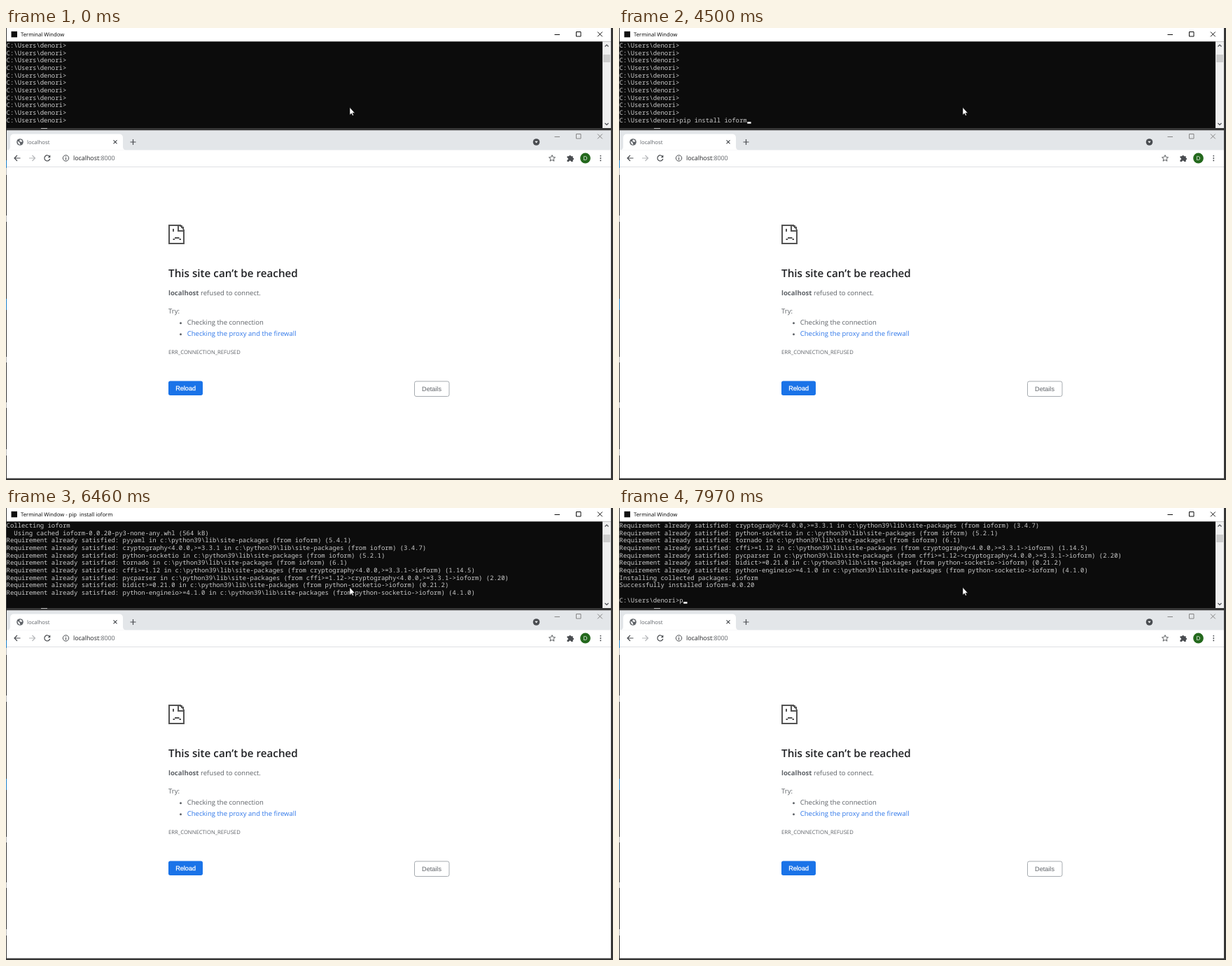
These frames come from a looping animation (867 px wide and 646 px high, 8000 ms). An HTML page:

```html
<!DOCTYPE html>
<html lang="en">
<head>
<meta charset="utf-8">
<title>Install in a terminal</title>
<style>
  html, body { margin: 0; width: 867px; height: 646px; overflow: hidden; background: #363636; }
  svg { display: block; }
  text { font-family: "Open Sans", sans-serif; font-size: 9.55px; fill: #5f6368;
         white-space: pre; text-rendering: geometricPrecision; }
  #title { font-size: 7.7px; fill: #000; }
  #console text { font-family: "Noto Sans Mono", monospace; font-size: 8.93px; fill: #ccc; }
  .button { font-family: "Liberation Sans", sans-serif; font-size: 9.15px; text-anchor: middle; }
  .line { fill: none; stroke: #4a4d51; stroke-width: 1.2; }
</style>
</head>
<body>
<svg width="867" height="646" viewBox="0 0 867 646">
  <defs>
    <path id="controls" d="M783.5 9.5h7.5M814.5 5.5h6.5v6.5h-6.5zM845 5.5l6.8 6.8M851.8 5.5l-6.8 6.8" fill="none"/>
  </defs>

  <!-- Desktop showing past the window edges -->
  <rect width="867" height="646" fill="#363636"/>
  <path d="M0 200h1v10h-1zM0 268h1v9h-1zM0 470h1v8h-1zM0 535h1v8h-1zM0 602h1v9h-1zM50 143h9v1h-9z" fill="#bbb"/>
  <path d="M0 189h1v11h-1zM0 387h1v16h-1z" fill="#1a7fc8"/>

  <!-- Terminal window -->
  <rect x="1" width="863" height="19.5" fill="#fff"/>
  <rect x="7.5" y="4.8" width="8.5" height="8.5" fill="#111"/>
  <text id="title" x="21" y="12"></text>
  <use href="#controls" stroke="#111"/>
  <rect x="1" y="19.5" width="851" height="123.5" fill="#0c0c0c"/>
  <rect x="852" y="19.5" width="12" height="123.5" fill="#f0f0f0"/>
  <rect x="853" y="38" width="10" height="11" fill="#cdcdcd"/>
  <path d="M855.5 26.5l2.5-2.5 2.5 2.5M855.5 136l2.5 2.5 2.5-2.5" class="line"/>
  <g id="console"></g>
  <rect id="caret" y="134.1" width="5.36" height="2.6" fill="#f2f2f2"/>
  <path d="M491 113.6v10.6l2.4-2.2 1.5 3.3 1.6-.7-1.5-3.2h3.2z" fill="#fff" stroke="#111" stroke-width=".5"/>

  <!-- Browser frame -->
  <rect x="1" y="146.5" width="863" height="497" fill="#fff"/>
  <rect x="1" y="146.5" width="863" height="28" fill="#e3e6e9"/>
  <path d="M1 174.5q5 0 5-5v-12.5q0-5.5 5.5-5.5h150q5.5 0 5.5 5.5v12.5q0 5 5 5z" fill="#fff"/>
  <circle cx="20" cy="163" r="4.8" fill="#5f6368"/>
  <path d="M16.5 162q2.5 0 3 1.8t1 3q-3.5-.3-4-4.8M20 159.3q2 .2 3.5 2.7l-2 1-2.3-1.4z" fill="#fff"/>
  <text x="30" y="165.6" style="font-size:7.75px">localhost</text>
  <path d="M153.5 160.4l5 5M158.5 160.4l-5 5M177.5 163h8M181.5 159v8" class="line"/>
  <circle cx="757.5" cy="163" r="4.8" fill="#4a4d51"/>
  <path d="M755.3 161.8h4.4l-2.2 2.6z" fill="#fff"/>
  <use href="#controls" y="146" stroke="#858585"/>
  <rect x="1" y="198" width="863" height="1" fill="#dfe1e4"/>
  <path d="M20.5 186h-8.5M16 182l-4 4 4 4" class="line"/>
  <path d="M33 186h8.5M37.5 182l4 4-4 4" class="line" style="stroke:#b5b7ba"/>
  <path d="M62.3 183.8a4 4 0 1 0 .5 3.2" class="line"/>
  <path d="M63.3 181.6v3.6h-3.6z" fill="#4a4d51"/>
  <circle cx="85.5" cy="186" r="4.2" class="line" style="stroke-width:1"/>
  <path d="M85.5 185.4v3M85.5 183.4v1" class="line"/>
  <text x="96" y="189.4" style="font-size:8.85px"><tspan fill="#202124">localhost</tspan>:8000</text>
  <path d="M780 181.6l1.3 3 3.2.3-2.4 2.1.8 3.2-2.9-1.7-2.9 1.7.8-3.2-2.4-2.1 3.2-.3z" class="line" style="stroke-width:.9"/>
  <path d="M801.5 183.3h2.7a1.4 1.4 0 0 1 2.8 0h2.7v2.4a1.4 1.4 0 0 1 0 2.8v2.5h-2.6a1.5 1.5 0 0 0-3 0h-2.6v-2.6a1.5 1.5 0 0 0 0-3z" fill="#4a4d51"/>
  <circle cx="827.5" cy="186" r="7.4" fill="#24691d"/>
  <text x="827.5" y="189" text-anchor="middle" style="font-size:8px;fill:#fff">D</text>
  <path d="M848.5 182h1.6v1.6h-1.6zM848.5 185.3h1.6v1.6h-1.6zM848.5 188.6h1.6v1.6h-1.6z" fill="#4a4d51"/>

  <!-- Error page -->
  <path d="M249 282h-16v26h21v-20M246 281v9h9M249 281v2h2v2h2v3" class="line" style="stroke:#535353;stroke-width:2"/>
  <path d="M238 287h2v4h-2zM241 299h6.5v2h-6.5zM238.5 301h2.5v2h-2.5zM247.5 301h2.5v2h-2.5z" fill="#535353"/>
  <text x="232" y="356.3" style="font-size:15.25px;font-weight:600;fill:#202124">This site can’t be reached</text>
  <text x="232" y="382.4"><tspan font-weight="700">localhost</tspan> refused to connect.</text>
  <text x="232" y="408.4">Try:</text>
  <circle cx="249.5" cy="421.7" r="1.5" fill="#5f6368"/>
  <text x="258.7" y="424.4">Checking the connection</text>
  <circle cx="249.5" cy="437.7" r="1.5" fill="#5f6368"/>
  <text x="258.7" y="440.4" style="fill:#3078e9">Checking the proxy and the firewall</text>
  <text x="232" y="465.8" style="font-size:7.68px">ERR_CONNECTION_REFUSED</text>
  <rect x="232" y="504.5" width="49" height="20.5" rx="2.7" fill="#1a73e8"/>
  <text x="256.6" y="518" class="button" style="fill:#fff;stroke:#fff;stroke-width:.25">Reload</text>
  <rect x="583.5" y="505" width="49.5" height="21.5" rx="2.5" fill="#fff" stroke="#a6abb0"/>
  <text x="608" y="518.8" class="button">Details</text>
</svg>

<script>
const LOOP = 8000, ROWS = 11, CELL = 5.36, PITCH = 10.68, LEFT = 1, LAST_BASELINE = 134.8;
const PROMPT = "C:\\Users\\denori>", COMMAND = "pip install ioform", TITLE = "Terminal Window";

const satisfied = (name, version, parent = "") =>
  `Requirement already satisfied: ${name} in c:\\python39\\lib\\site-packages (from ${parent}ioform) (${version})`;
const crypto = "cryptography<4.0.0,>=3.3.1";
const history = [
  ...Array(10).fill(PROMPT),
  PROMPT + COMMAND,
  "Collecting ioform",
  "  Using cached ioform-0.0.20-py3-none-any.whl (564 kB)",
  satisfied("pyyaml", "5.4.1"),
  satisfied(crypto, "3.4.7"),
  satisfied("python-socketio", "5.2.1"),
  satisfied("tornado", "6.1"),
  satisfied("cffi>=1.12", "1.14.5", crypto + "->"),
  satisfied("pycparser", "2.20", `cffi>=1.12->${crypto}->`),
  satisfied("bidict>=0.21.0", "0.21.2", "python-socketio->"),
  satisfied("python-engineio>=4.1.0", "4.1.0", "python-socketio->"),
  "Installing collected packages: ioform",
  "Successfully installed ioform-0.0.20",
  "",
];

// Each event changes some fields of the terminal state.
const key = chars => s => ({ input: s.input + chars, caret: true });
const backspace = s => ({ input: s.input.slice(0, -1), caret: true });
const caret = on => () => ({ caret: on });
const print = lines => () => ({ lines, input: "" });
const events = [
  [400, caret(true)],
  [700, key("p")], [820, key("i")], [940, key("p")], [1070, key(" ")],
  [1340, key("i")], [1460, key("ns")],
  [1730, key("t")], [1850, key("a")], [1970, key("l")], [2090, key("l")],
  [2240, key(" ")], [2360, key("i")], [2480, key("f")],
  [3030, caret(false)], [3150, backspace],
  [3430, key("o")], [3550, key("f")], [3700, key("o")], [3820, key("r")],
  [3970, key("m")], [3970, caret(false)], [4500, caret(true)],
  [4620, print(11)], [4620, () => ({ prompt: "" })],
  [4760, () => ({ title: `${TITLE} - pip  install ioform` })],
  [5010, caret(false)], [5540, caret(true)], [6040, caret(false)],
  [6310, print(20)], [6460, print(21)], [6610, print(22)], [6740, print(23)],
  [6860, print(24)], [6860, () => ({ prompt: PROMPT, title: TITLE })],
  [7690, caret(true)], [7970, key("p")],
];

function stateAt(time) {
  const state = { lines: 10, prompt: PROMPT, input: "", caret: false, title: TITLE };
  for (const [at, change] of events) if (at <= time) Object.assign(state, change(state));
  return state;
}

const byId = id => document.getElementById(id);
const rows = Array.from({ length: ROWS }, (_, i) => {
  const row = document.createElementNS("http://www.w3.org/2000/svg", "text");
  row.setAttribute("x", LEFT - 0.4);
  row.setAttribute("y", LAST_BASELINE - PITCH * (ROWS - 1 - i));
  return byId("console").appendChild(row);
});

function draw(time) {
  const state = stateAt(time), current = state.prompt + state.input;
  const screen = [...history.slice(0, state.lines), current].slice(-ROWS);
  rows.forEach((row, i) => { row.textContent = screen[i]; });
  byId("title").textContent = state.title;
  byId("caret").setAttribute("x", LEFT + current.length * CELL);
  byId("caret").setAttribute("visibility", state.caret ? "visible" : "hidden");
}

const start = performance.now();
function tick() {
  draw((performance.now() - start) % LOOP);
  requestAnimationFrame(tick);
}
tick();
</script>
</body>
</html>
```
